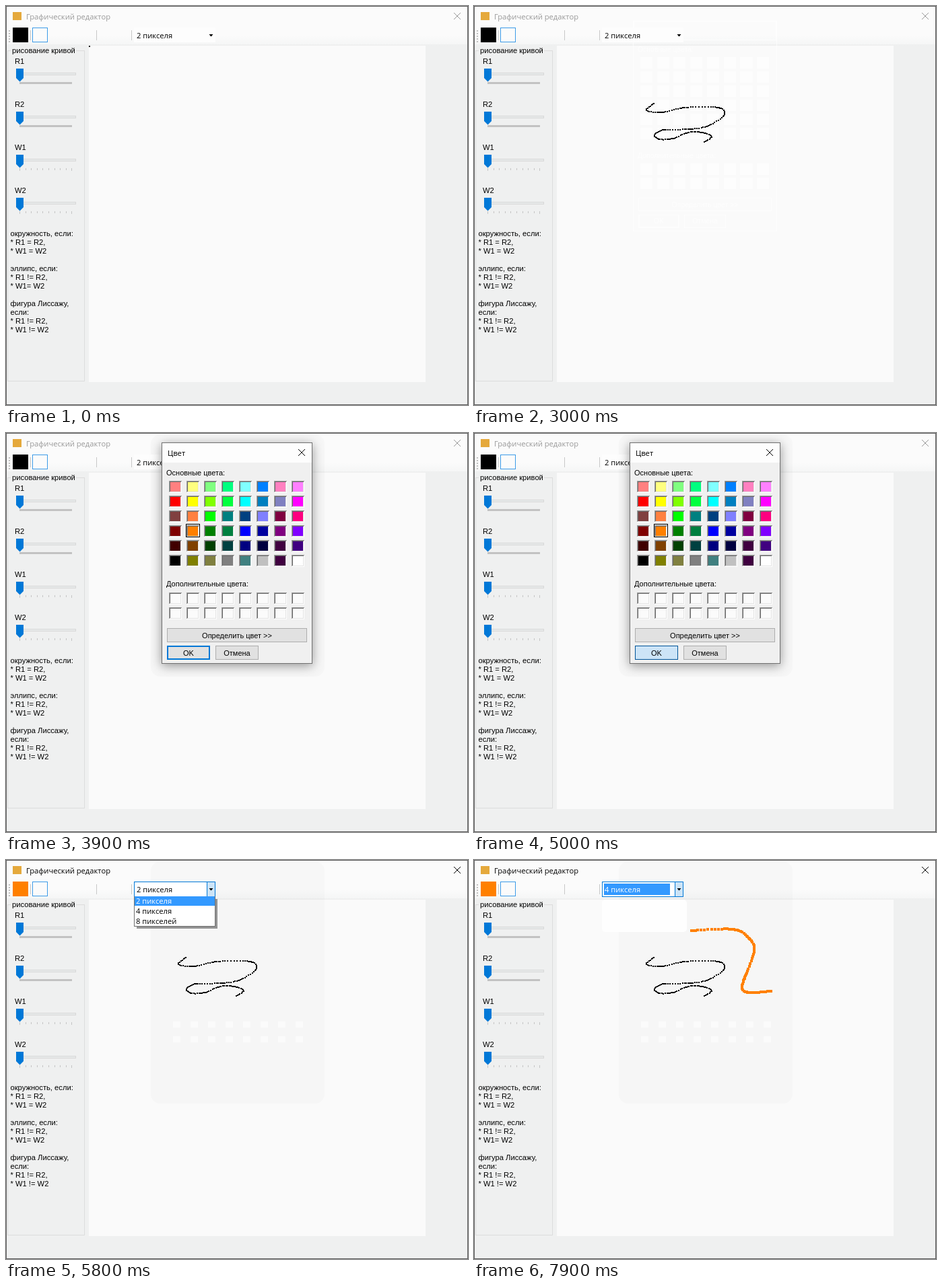
Write an HTML page that moves like this. It is 686 px wide and 593 px high and loops after 8000 ms.

```html
<!DOCTYPE html>
<html lang="ru">
<head>
<meta charset="utf-8">
<title>Графический редактор</title>
<style>
html, body { margin: 0; width: 100%; height: 100%; overflow: hidden; background: #f0f0f0; }
svg { display: block; font: 11.2px "Liberation Sans", Arial, sans-serif; }
rect, path { shape-rendering: crispEdges; }
.smooth { shape-rendering: auto; }
.ui { font: 11.2px "Open Sans", "Noto Sans", sans-serif; }
.dlg { font-size: 11px; }
.shadow { filter: drop-shadow(0 3px 8px #0006); }
.ghost * { fill: #fff; stroke: none; filter: none; }
.ghost .hollow { fill: none; stroke: #fff; }
</style>
</head>
<body>
<svg id="stage" width="686" height="593" viewBox="0 0 686 593"></svg>
<script>
const LOOP = 8000, STEP = 100, BLUE = '#0078d7', PICK = '#3399ff', ORANGE = '#ff8000';
const stage = document.getElementById('stage');
const range = (n, f) => Array.from({ length: n }, (_, i) => f(i)).join('');
const rect = (x, y, w, h, fill, more = '') =>
  `<rect x="${x}" y="${y}" width="${w}" height="${h}" fill="${fill}" ${more}/>`;
// one-pixel outline drawn inside the given box
const box = (x, y, w, h, fill, line, more = '') =>
  rect(x + .5, y + .5, w - 1, h - 1, fill, `stroke="${line}" ${more}`);
const text = (x, y, s, more = '') => `<text x="${x}" y="${y}" ${more}>${s}</text>`;
const cross = (x, y, more) =>
  `<path class="smooth" d="M${x} ${y}l10 10m0-10l-10 10" fill="none" ${more}/>`;

function slider(label, i) {
  const y = 93 + 64 * i;
  const scale = i < 2
    ? rect(20, y + 20, 78, 3, '#c2c2c2')
    : range(10, k => rect(Math.round(20 + k * 8.6), y + 20, 1, k % 9 ? 3 : 4, '#c4c4c4'));
  return text(13, y - 7, label) + box(20, y + 6, 84, 4, '#e7eaea', '#d8d8d8') + scale +
    `<path class="smooth" d="M15 ${y}h11v14l-5.5 5.5-5.5-5.5z" fill="${BLUE}"/>`;
}

const notes = ['окружность, если:', '* R1 = R2,', '* W1 = W2', '', 'эллипс, если:', '* R1 != R2,',
  '* W1= W2', '', 'фигура Лиссажу,', 'если:', '* R1 != R2,', '* W1 != W2'];

const mainWindow = () =>
  rect(0, 0, 686, 593, '#eff0f0') + rect(0, 0, 686, 32, '#fbfbfb') +
  rect(0, 31, 686, 26, 'url(#bar)') +
  rect(10, 9, 13, 12, '#e5a93c') +
  text(30, 20, 'Графический редактор', 'class="ui" id="title"') +
  cross(665, 10, 'id="close"') +
  range(5, i => rect(4, 36 + i * 4, 2, 2, '#c0c0c0')) +
  [36, 134, 186].map(x => rect(x, 36, 1, 15, '#c8c8c8')).join('') +
  rect(10, 32, 23, 22, '#000', 'id="pen"') + box(39, 32, 23, 22, '#fbfbfb', '#3c9be8') +
  rect(123, 59, 500, 500, '#fafafa') +
  '<path d="M7 66.5H2.5V557.5H116.5V66.5H104" fill="none" stroke="#dcdcdc"/>' +
  text(9, 70, 'рисование кривой') +
  ['R1', 'R2', 'W1', 'W2'].map(slider).join('') +
  notes.map((s, i) => text(6.5, 342 + 13 * i, s)).join('') +
  box(0, 0, 686, 593, 'none', '#5c5c5c');

// the system colour grid, one hex digit per channel
const basic = ('F88 FF8 8F8 0F8 8FF 08F F8C F8F F00 FF0 8F0 0F4 0FF 08C 88C F0F ' +
  '844 F84 0F0 088 048 88F 804 F08 800 F80 080 084 00F 00A 808 80F ' +
  '400 840 040 044 008 004 404 408 000 880 884 888 488 CCC 404 FFF').split(' ');
const widen = c => '#' + [...c].map(d => d === 'F' ? 'ff' : d + '0').join('');
const grid = (list, top, cell) =>
  list.map((c, i) => cell(242 + i % 8 * 26, top + (i >> 3) * 22, c)).join('');
const edge = (x, y, color) =>
  `<path class="hollow" d="M${x + .5} ${y + 17}v-16.5h18" fill="none" stroke="${color}"/>`;
const well = (x, y, fill) => rect(x, y, 19, 18, '#fff') + rect(x, y, 18, 17, '#e3e3e3') +
  rect(x + 1, y + 1, 16, 15, fill) + edge(x, y, '#a0a0a0') + 
  `<path class="hollow" d="M${x + 1.5} ${y + 16}v-14.5h16" fill="none" stroke="#696969"/>`;
const blank = Array(16).fill('#fbfbfb');

const button = (name, x, y, w, label) =>
  box(x, y, w, 21, '#e1e1e1', '#adadad', `class="hollow ${name}"`) +
  text(x + w / 2, y + 14.5, label, 'text-anchor="middle"');

const dialog = () =>
  box(231, 14, 224, 329, '#f0f0f0', '#707070', 'class="hollow shadow"') +
  rect(232, 15, 222, 29, '#fdfdfd', 'class="hollow" stroke="none"') +
  text(240, 34, 'Цвет', 'class="ui"') + cross(434, 24, 'class="hollow" stroke="#000"') +
  text(238, 63, 'Основные цвета:') + text(238, 228, 'Дополнительные цвета:') +
  grid(basic.map(widen), 71, well) + grid(blank, 237, well) +
  '<g class="first">' + box(241, 179, 21, 20, 'none', '#000') +
  box(239, 178, 25, 23, 'none', '#000', 'stroke-dasharray="1 1"') + '</g>' +
  box(267, 135, 21, 20, 'none', '#000', 'class="second"') +
  button('define', 239, 290, 208, 'Определить цвет &gt;&gt;') +
  button('ok', 239, 316, 64, 'OK') + box(240, 317, 62, 19, 'none', BLUE, 'class="hollow inner"') +
  button('cancel', 311, 316, 64, 'Отмена');

const sizes = ['2 пикселя', '4 пикселя', '8 пикселей'];
const combo = () =>
  rect(190, 32, 121, 22, '#fdfdfd') +
  '<g id="frame">' + box(190, 32, 121, 23, '#fff', BLUE) + box(298, 32, 13, 23, '#cce4f7', BLUE) + '</g>' +
  rect(193, 35, 98, 17, PICK, 'id="chosen"') +
  text(194, 48, sizes[0], 'class="ui" id="value"') +
  '<path class="smooth" d="M301.5 42h6l-3 3.5z"/>' +
  '<g id="list" class="ui">' + rect(194, 58, 120, 44, '#0006', 'class="smooth"') +
  box(190, 54, 121, 45, '#fff', '#707070') + rect(191, 54, 119, 14, PICK, 'id="mark"') +
  sizes.map((s, i) => text(193, 65 + 15 * i, s, 'class="item"')).join('') + '</g>';

// Squares along a Catmull-Rom curve. The hand slows down at each key point,
// so the squares stand close there and apart on the straights.
function trail(path, size, color, from, to) {
  const keys = path.split(' ').map(p => p.split(',').map(Number));
  const at = i => keys[Math.max(0, Math.min(keys.length - 1, i))];
  const spots = [at(0)];
  for (let i = 0; i < keys.length - 1; i++) {
    const [a, b, c, d] = [at(i - 1), at(i), at(i + 1), at(i + 2)];
    const reach = Math.hypot(c[0] - b[0], c[1] - b[1]);
    for (let u = 0; u < 1; u += .005) {
      const p = [0, 1].map(k => b[k] + u / 2 * (c[k] - a[k] +
        u * (2 * a[k] - 5 * b[k] + 4 * c[k] - d[k] + u * (3 * b[k] - a[k] - 3 * c[k] + d[k]))));
      const [x, y] = spots[spots.length - 1];
      const gap = 1.5 + reach * .06 * Math.sin(Math.PI * u);
      if (Math.hypot(p[0] - x, p[1] - y) >= gap) spots.push(p);
    }
  }
  spots.push(at(keys.length));
  return spots.map(([x, y], i) =>
    rect(Math.round(x - size / 2), Math.round(y - size / 2), size, size, color,
      `class="spot" data-t="${from + (to - from) * i / (spots.length - 1)}"`)).join('');
}

const strokes = () =>
  trail('267,145 256,155 280,158 313,151 363,151 371,163 345,179 318,183 280,184', 2, '#000', 650, 1400) +
  trail('280,184 268,191 275,198 295,197 318,188 338,188 353,194 342,202', 2, '#000', 1500, 2200) +
  trail('323,105 385,103 408,116 416,135 402,175 398,190 408,197 441,195', 4, ORANGE, 6800, 7900);

stage.innerHTML =
  '<defs><linearGradient id="bar" x2="0" y2="1"><stop offset=".5" stop-color="#fbfbfb"/>' +
  '<stop offset="1" stop-color="#f5f6f6"/></linearGradient></defs>' +
  mainWindow() +
  '<g id="haze">' + rect(215, 2, 258, 360, '#00000004', 'rx="14" class="smooth"') +
  grid(blank, 237, (x, y, c) => rect(x + 6, y + 3, 11, 9, c)) + '</g>' +
  `<g id="hint" class="dlg ghost" opacity=".7">${dialog()}</g>` +
  rect(190, 59, 126, 48, '#fefefe', 'id="patch" rx="5" class="smooth"') +
  rect(123, 59, 2, 2, '#000', 'id="dot"') +
  strokes() + combo() + `<g id="dialog" class="dlg">${dialog()}</g>`;

const $ = s => stage.querySelector(s), all = s => [...stage.querySelectorAll(s)];
const set = (s, name, v) => $(s).setAttribute(name, v);
const show = (s, on) => set(s, 'visibility', on ? 'visible' : 'hidden');
const zoom = (s, k) => set(s, 'transform', `translate(343 178.5) scale(${k}) translate(-343 -178.5)`);
const paint = (s, fill, line) => { set(s, 'fill', fill); set(s, 'stroke', line); };
const spots = all('.spot'), items = all('.item');
for (const s of all('#hint .first, #hint .second')) s.remove();
zoom('#hint', .953);

function draw(now) {
  const t = Math.floor(now % LOOP / STEP) * STEP;
  const within = (a, b) => t >= a && t < b;

  const ink = t < 600 || within(2900, 5100) ? '#999' : '#000';
  set('#title', 'fill', ink);
  set('#close', 'stroke', ink);
  set('#pen', 'fill', within(2700, 2900) ? '#b5d7f3' : t >= 5100 ? ORANGE : '#000');
  show('#dot', t < 600);
  for (const s of spots) s.setAttribute('visibility', t >= +s.dataset.t ? 'visible' : 'hidden');

  // the dialog eases in from 3000 and out from 5000
  const left = Math.max(0, t < 4000 ? 3300 - t : t - 5000) / 300;
  show('#hint', t === 3000);
  show('#haze', t >= 3100);
  set('#dialog', 'display', within(3100, 5200) ? 'inline' : 'none');
  set('#dialog', 'opacity', 1 - .6 * left ** 2);
  zoom('#dialog', 1 - .047 * left ** 2);
  show('#dialog .first', t < 3900);
  show('#dialog .second', t >= 3900);
  const lit = within(4400, 4600);
  paint('#dialog .define', lit ? '#e5f1fb' : '#e1e1e1', lit ? BLUE : '#adadad');
  const pressed = t >= 4900;
  paint('#dialog .ok', pressed ? '#cce4f7' : t >= 4800 ? '#e5f1fb' : '#e1e1e1', pressed ? '#005499' : BLUE);
  show('#dialog .inner', t < 4800);

  const row = t < 5900 ? 0 : within(6000, 6200) ? 2 : 1;
  const picked = t >= 6500;
  show('#frame', t >= 5600);
  show('#list', within(5700, 6500));
  set('#mark', 'y', 54 + 15 * row);
  items.forEach((e, i) => e.setAttribute('fill', i === row ? '#fff' : '#000'));
  show('#chosen', picked);
  show('#patch', picked);
  $('#value').textContent = sizes[+picked];
  set('#value', 'fill', picked ? '#fff' : '#000');
}

function tick() {
  draw(performance.now());
  requestAnimationFrame(tick);
}
tick();
</script>
</body>
</html>
```
